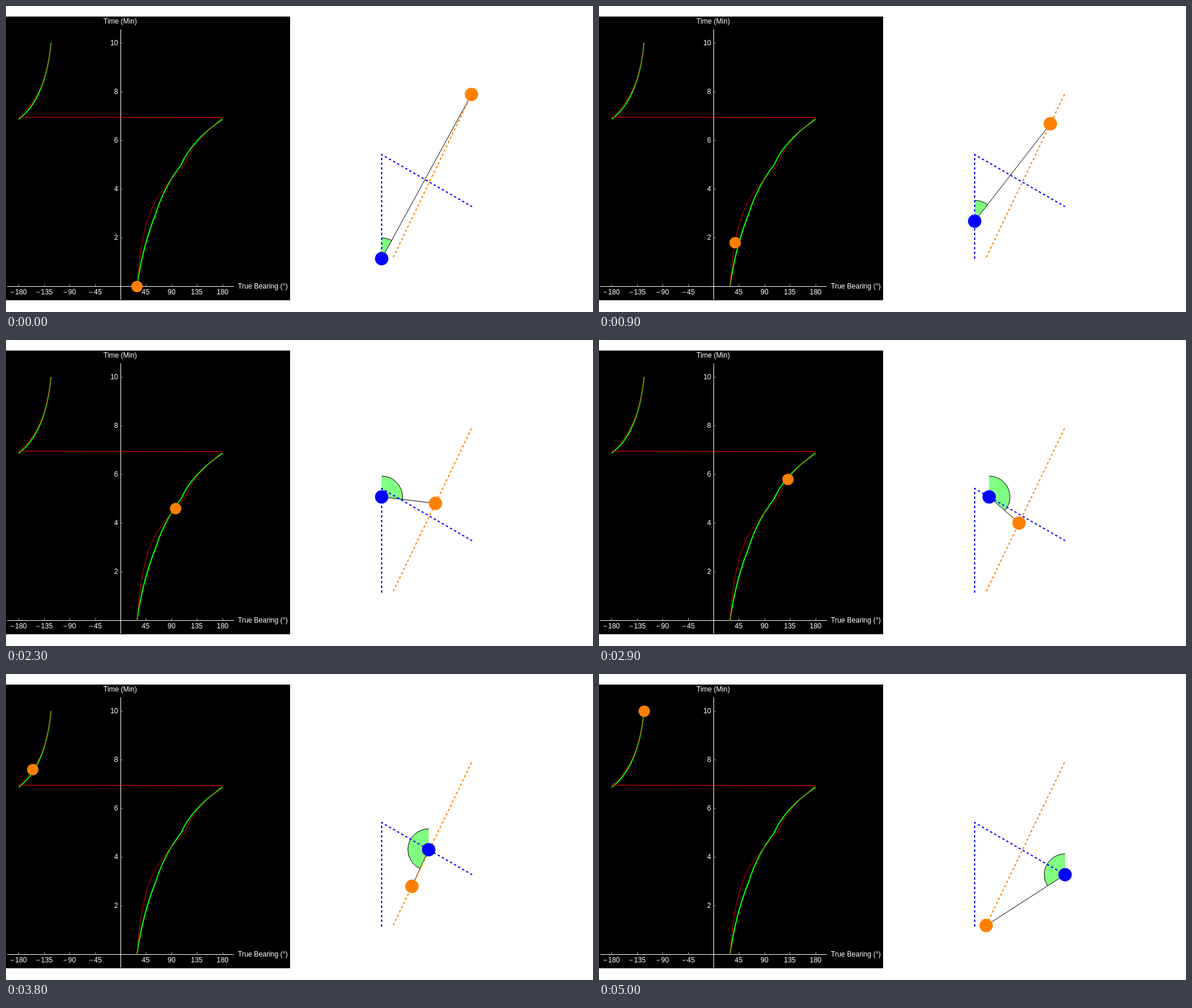
An HTML page with a canvas that plays this animation: 1000x522 px, repeating every 5.1 s.

```html
<!DOCTYPE html>
<html lang="en">
<head>
<meta charset="utf-8">
<title>True bearing over time</title>
<style>
html, body { margin: 0; width: 100%; height: 100%; overflow: hidden; background: #fff; }
canvas { display: block; }
</style>
</head>
<body>
<canvas id="stage" width="1000" height="522"></canvas>
<script>
const ctx = document.getElementById('stage').getContext('2d');
const STEP_MS = 100, STEPS = 51, TURN = 5, END = 10;
const ORANGE = '#ff8000', BLUE = '#00f';
const ship = [[640, 431], [640, 253.4], [794, 342.3]];
const target = [[793, 150.8], [659.5, 429]];

const mix = (a, b, k) => [a[0] + (b[0] - a[0]) * k, a[1] + (b[1] - a[1]) * k];
const shipAt = t => t < TURN
  ? mix(ship[0], ship[1], t / TURN)
  : mix(ship[1], ship[2], (t - TURN) / (END - TURN));
const targetAt = t => mix(target[0], target[1], t / END);

// Clockwise from north, in radians, -PI to PI
function bearing(t) {
  const a = shipAt(t), b = targetAt(t);
  return Math.atan2(b[0] - a[0], a[1] - b[1]);
}

const plotX = deg => 195.5 + deg * 0.964;
const plotY = min => 478.5 - min * 41.5;
const plotBearing = t => [plotX(bearing(t) * 180 / Math.PI), plotY(t)];

function line(points, color, width, dash = []) {
  ctx.beginPath();
  points.forEach(p => ctx.lineTo(p[0], p[1]));
  ctx.strokeStyle = color;
  ctx.lineWidth = width;
  ctx.setLineDash(dash);
  ctx.stroke();
  ctx.setLineDash([]);
}

function disc([x, y], r, color) {
  ctx.beginPath();
  ctx.arc(x, y, r, 0, 2 * Math.PI);
  ctx.fillStyle = color;
  ctx.fill();
}

function label(str, x, y, align) {
  ctx.textAlign = align;
  ctx.fillText(str, x, y);
}

function drawAxes() {
  ctx.fillStyle = '#000';
  ctx.fillRect(0, 18, 484, 484);
  ctx.font = '12px "Liberation Sans", Arial, sans-serif';
  ctx.fillStyle = '#fff';
  label('Time (Min)', 194.5, 30, 'center');
  label('True Bearing (°)', 395, 482, 'left');
  for (let deg = -180; deg <= 180; deg += 45) {
    if (!deg) continue;
    const x = Math.floor(plotX(deg)) + 0.5, text = String(Math.abs(deg));
    line([[x, 478], [x, 474]], '#888', 1);
    if (deg < 0) {
      label(text, x + 4, 492, 'center');
      label('−', x - 1 - ctx.measureText(text).width / 2, 492, 'center');
    } else {
      label(text, x - 0.5, 492, 'center');
    }
  }
  for (let min = 2; min <= END; min += 2) {
    const y = Math.floor(plotY(min)) + 0.5;
    line([[196, y], [199, y]], '#888', 1);
    label(String(min), 191, y + 3.5, 'right');
  }
  line([[2, 478.5], [388, 478.5]], '#fff', 1);
  line([[195.5, 40], [195.5, 501]], '#fff', 1);
}

function drawCurves() {
  ctx.beginPath();
  ctx.moveTo(223, 478.5);
  ctx.quadraticCurveTo(233.3, 408, 255.3, 354);
  ctx.quadraticCurveTo(268.8, 309.3, 298.3, 271);
  ctx.quadraticCurveTo(315.5, 230.3, 369, 193);
  ctx.moveTo(21.5, 193);
  ctx.quadraticCurveTo(67.2, 159.4, 76.8, 63);
  ctx.strokeStyle = '#0f0';
  ctx.lineWidth = 2;
  ctx.stroke();

  const pts = [];
  for (let i = 0; i <= 500; i++) pts.push(plotBearing(i / 50));
  line(pts, '#f00', 1);
}

function drawScene(t) {
  const a = shipAt(t), b = targetAt(t), angle = bearing(t), north = -Math.PI / 2;
  const arc = () => ctx.arc(a[0], a[1], 35.5, north, north + angle, angle < 0);
  ctx.beginPath();
  ctx.moveTo(a[0], a[1]);
  arc();
  ctx.fillStyle = '#80ff80';
  ctx.fill();
  ctx.beginPath();
  arc();
  ctx.strokeStyle = '#000';
  ctx.lineWidth = 1;
  ctx.stroke();
  line([a, b], '#000', 1);
  line(ship, BLUE, 2, [4, 4]);
  line(target, ORANGE, 2, [4, 4]);
  disc(a, 11.4, BLUE);
  disc(b, 11.4, ORANGE);
}

function frame() {
  const step = Math.floor(performance.now() / STEP_MS) % STEPS;
  const t = step * END / (STEPS - 1);
  ctx.fillStyle = '#fff';
  ctx.fillRect(0, 0, 1000, 522);
  drawAxes();
  drawCurves();
  disc(plotBearing(t), 9.8, ORANGE);
  drawScene(t);
  requestAnimationFrame(frame);
}
frame();
</script>
</body>
</html>
```
